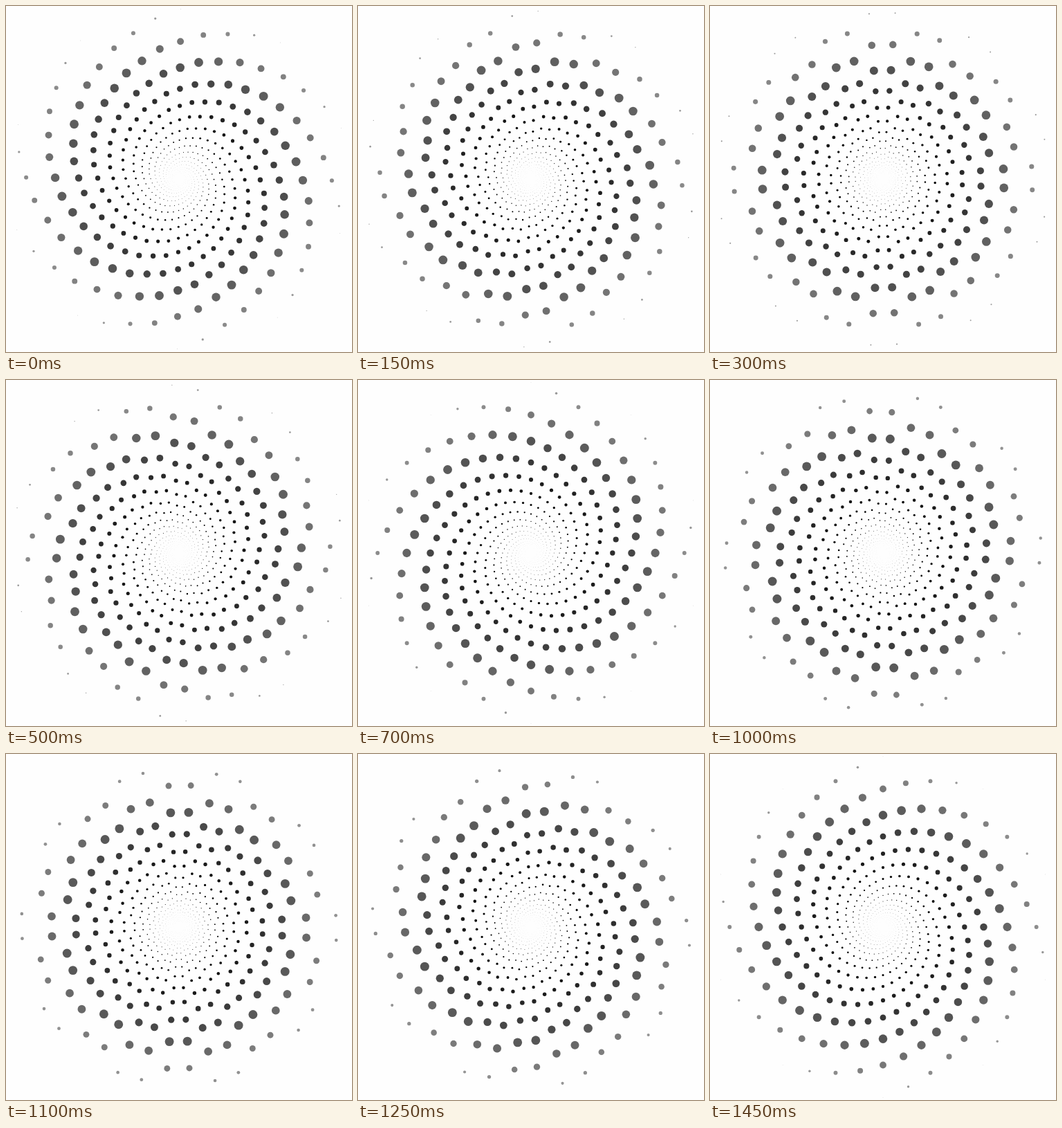
Write an HTML page with a canvas that moves like this. It is 500 px wide and 500 px high and loops after 1.5 s.

```html
<!DOCTYPE html>
<html lang="en">
<head>
<meta charset="utf-8">
<title>Spiral dots</title>
<style>
  html, body { margin: 0; width: 100%; height: 100%; overflow: hidden; background: #fefefe; }
  canvas { display: block; width: 500px; height: 500px; }
</style>
</head>
<body>
<canvas id="stage" width="500" height="500"></canvas>
<script>
const ctx = document.getElementById('stage').getContext('2d');

const CENTER = 250;
const LOOP = 1500;
const STEP = 50;
const RAYS = 40;
const DEPTHS = 17;
const OUTER = 246.3;   // radius at which dots appear and vanish
const SHRINK = 0.81;   // radius ratio between neighbours on one ray

const wrap = x => x - Math.floor(x);

// Dots swell from the rim, then shrink faster than their distance to the centre.
function dotSize(depth) {
  const rim = 0.3 + 6 * depth - 1.4 * depth * depth;
  const inner = 6.3 * Math.pow(SHRINK, 1.7 * (depth - 2));
  return depth < 1.8 ? Math.min(rim, inner, 6.45) : Math.min(inner, 6.45);
}

function dotColor(radius) {
  const v = Math.round(Math.max(0, (radius - 70) * 0.92));
  return `rgb(${v},${v},${v})`;
}

function draw(progress) {
  ctx.fillStyle = '#fefefe';
  ctx.fillRect(0, 0, 500, 500);
  const turn = progress * Math.PI / 10;

  for (let ray = 0; ray < RAYS; ray++) {
    const angle = ray * 2 * Math.PI / RAYS + turn;
    const sin = Math.sin(angle);
    const cos = Math.cos(angle);
    // Odd rays drift outward, even rays inward.
    const drift = (ray % 2 ? -0.5 : 0.5) * progress;
    const start = wrap(drift - ray / 4);

    for (let k = 0; k < DEPTHS; k++) {
      const depth = start + k;
      const radius = OUTER * Math.pow(SHRINK, depth);
      ctx.fillStyle = dotColor(radius);
      ctx.beginPath();
      ctx.arc(CENTER + radius * sin, CENTER - radius * cos, dotSize(depth), 0, 2 * Math.PI);
      ctx.fill();
    }
  }
}

const origin = performance.now();

function tick() {
  const time = Math.max(0, performance.now() - origin) % LOOP;
  draw((Math.floor(time / STEP) + 1) * STEP / LOOP);
  requestAnimationFrame(tick);
}
tick();
</script>
</body>
</html>
```
